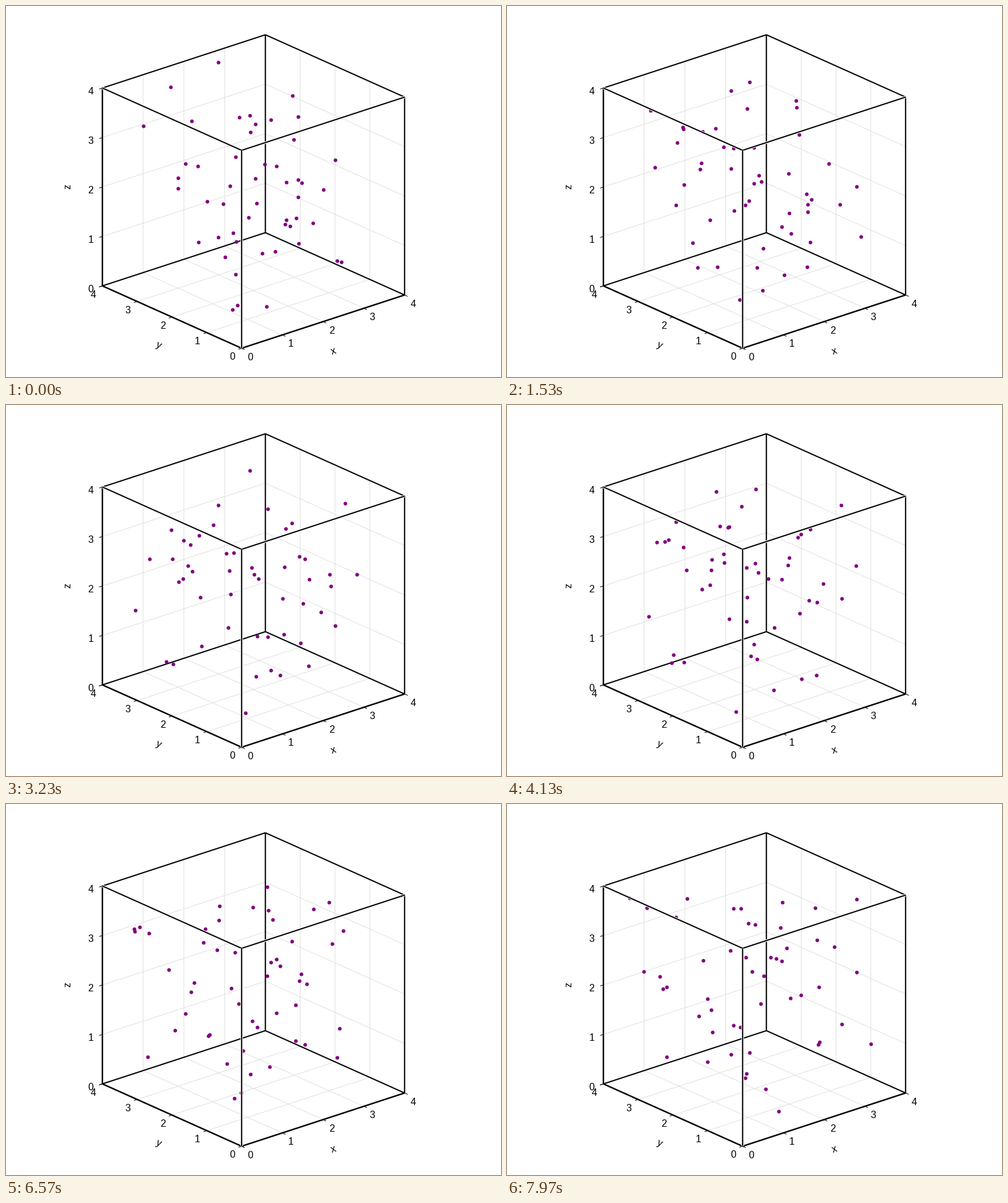
A matplotlib script for the animation above (8 s loop, 800x600 px).

```python
import numpy as np
import matplotlib.pyplot as plt
from matplotlib.animation import FuncAnimation

FRAMES = 240
FPS = 30
COUNT = 50
SIDE = 4
PX = 0.72  # one pixel in points at 100 dpi

# Orthographic camera; the cube's diagonal spans the stage height
AZIMUTH, ELEVATION = 1.275 * np.pi, np.pi / 8
SCALE = 600 / np.sqrt(3) / SIDE
sin_a, cos_a = np.sin(AZIMUTH), np.cos(AZIMUTH)
sin_e, cos_e = np.sin(ELEVATION), np.cos(ELEVATION)
VIEW = SCALE * np.array([[-sin_a, cos_a * sin_e],
                         [cos_a, sin_a * sin_e],
                         [0, -cos_e]])


def project(p):
    return np.array([400, 300]) + (np.asarray(p) - SIDE / 2) @ VIEW


fig = plt.figure(figsize=(8, 6), dpi=100, facecolor="white")
ax = fig.add_axes([0, 0, 1, 1])
ax.set_xlim(0, 800)
ax.set_ylim(600, 0)
ax.axis("off")


def line(a, b, width, color="black", z=2):
    (x0, y0), (x1, y1) = a, b
    ax.plot([x0, x1], [y0, y1], color=color, lw=width * PX, zorder=z,
            solid_capstyle="butt", snap=False)


def edge(a, b, width=2, z=2):
    line(project(a), project(b), width, z=z)


def front_edge(a, b, z):
    line(project(a), project(b), 4, "white", z)
    edge(a, b, z=z + 0.1)


def text(x, y, s, angle=0):
    ax.text(x, y, s, family="Liberation Sans", size=16 * PX, rotation=angle,
            rotation_mode="anchor", ha="center", va="center_baseline", zorder=8)


def tick(p, axis, dx, dy, label):
    d = -VIEW[axis] / np.hypot(*VIEW[axis])
    line(p, p + 5.5 * d, 1, z=3)
    text(p[0] + dx, p[1] + dy, label)


# Grid on the floor and the two back walls
for k in range(1, SIDE):
    for a, b in [((k, 0, 0), (k, 4, 0)), ((0, k, 0), (4, k, 0)),
                 ((4, k, 0), (4, k, 4)), ((4, 0, k), (4, 4, k)),
                 ((k, 4, 0), (k, 4, 4)), ((0, 4, k), (4, 4, k))]:
        line(project(a), project(b), 1, "#e0e0e0", z=1)

# Back and outer edges
for a, b in [((4, 4, 0), (4, 4, 4)), ((0, 4, 0), (4, 4, 0)),
             ((4, 0, 0), (4, 4, 0)), ((0, 4, 4), (4, 4, 4)),
             ((4, 0, 4), (4, 4, 4)), ((4, 0, 0), (4, 0, 4))]:
    edge(a, b)

# The three scaled axes
for a, b in [((0, 0, 0), (4, 0, 0)), ((0, 0, 0), (0, 4, 0)),
             ((0, 4, 0), (0, 4, 4))]:
    edge(a, b, 2.4, z=3)

# Edges in front of the dots
front_edge((0, 4, 4), (0, 0, 4), 5)
front_edge((0, 0, 4), (4, 0, 4), 5)
front_edge((0, 0, 0), (0, 0, 4), 6)

for k in range(SIDE + 1):
    tick(project((k, 0, 0)), 1, 14, 13.5, str(k))
    tick(project((0, k, 0)), 0, -15, 13, str(k))
    tick(project((0, 4, k)), 0, -19, 4.5, str(k))

text(528.5, 557.5, "x", 18)
text(247.5, 547.5, "y", -24)
text(98.5, 292, "z", 90)

# Dots: evenly spread homes, each with a smooth random wander
rng = np.random.default_rng(7)
plastic = 1.2207440846
steps = plastic ** -np.arange(1.0, 4.0)
homes = 0.2 + 3.6 * ((0.5 + np.outer(np.arange(COUNT), steps)) % 1)
freqs = np.array([0.08, 0.17, 0.31, 0.47])[:, None, None]
phases = rng.uniform(0, 2 * np.pi, (4, COUNT, 3))
dots = ax.scatter([], [], s=(6 * PX) ** 2, color="purple", linewidths=0,
                  zorder=4)


def bounce(p, low=0.1, high=3.9):
    width = high - low
    return high - abs((p - low) % (2 * width) - width)


def update(i):
    swing = np.sin(2 * np.pi * freqs * i / FPS + phases)
    wander = (0.045 / freqs * swing).sum(axis=0)
    dots.set_offsets(project(bounce(homes + wander)))
    return (dots,)


anim = FuncAnimation(fig, update, frames=FRAMES, interval=1000 / FPS,
                     init_func=lambda: update(0), repeat=True, repeat_delay=0)
plt.show()
```
